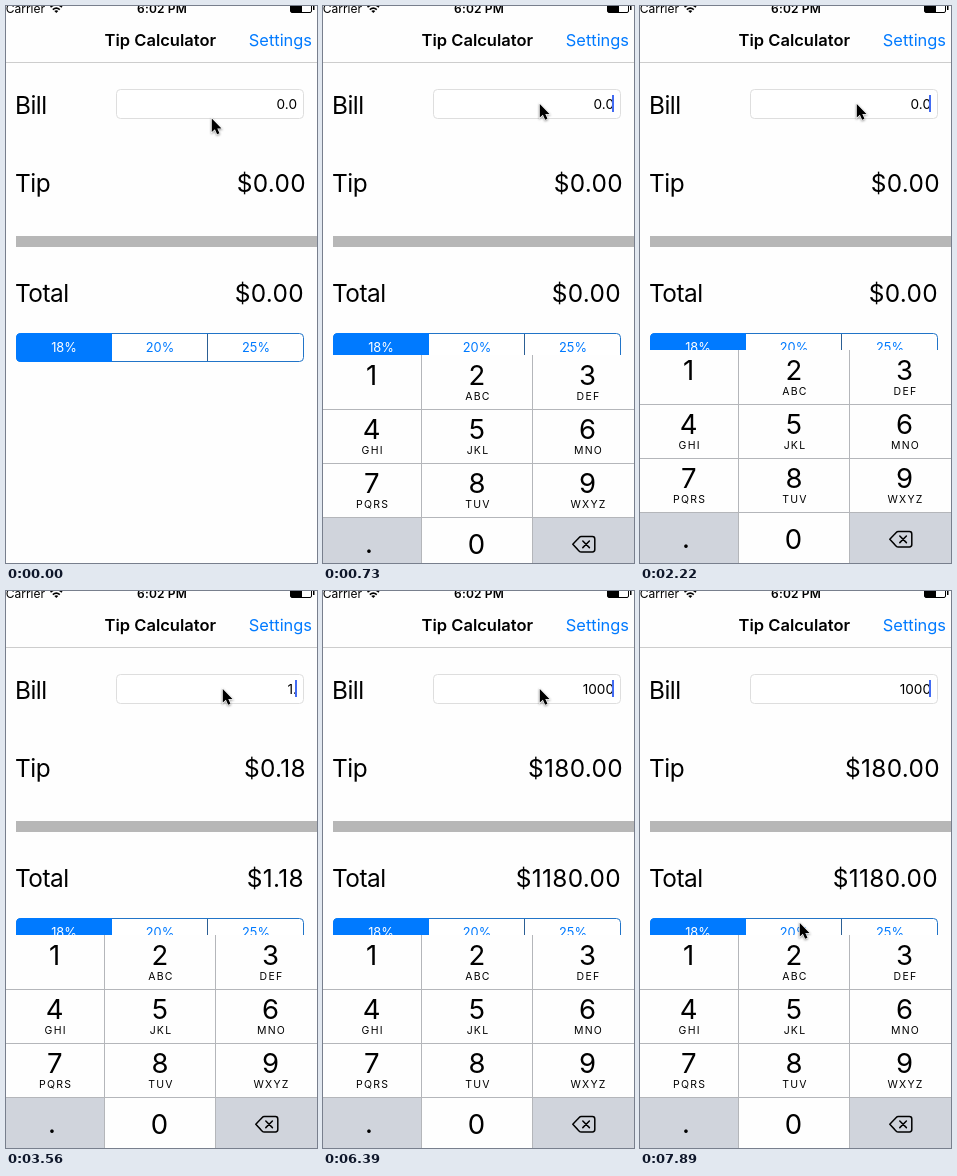
An HTML page that plays this animation: 311 by 557 pixels, repeating every 8000 ms.

```html
<!DOCTYPE html>
<html lang="en">
<head>
<meta charset="utf-8">
<title>Tip Calculator</title>
<style>
  html, body { margin: 0; width: 100%; height: 100%; overflow: hidden; background: #fff; }
  svg { display: block; width: 311px; height: 557px; font-family: Inter, "Liberation Sans", sans-serif; }
  .big { font-size: 24.4px; }
  .label { letter-spacing: -.5px; }
  .money { letter-spacing: .35px; text-anchor: end; }
  .end { text-anchor: end; }
  .mid { text-anchor: middle; }
  .blue { fill: #007aff; }
  .digit { font-size: 27.5px; text-anchor: middle; }
  .abc { font-size: 10.5px; letter-spacing: 1.25px; text-anchor: middle; }
  #pointer { filter: drop-shadow(0 1px 1px rgba(0, 0, 0, .4)); }
</style>
</head>
<body>
<svg viewBox="0 0 311 557">
  <rect width="311" height="557" fill="#fefefe"/>

  <g id="status">
    <text x="-.3" y="6.5" font-size="12">Carrier</text>
    <g fill="none" stroke="#000" stroke-width="1.6">
      <path d="M44.5 1.2Q50.3 -4 56 1.2M46.8 3.6Q50.3 .6 53.8 3.6"/>
    </g>
    <path d="M48.3 5Q50.3 3.4 52.3 5L50.3 7Z"/>
    <text class="mid" x="156" y="6.5" font-size="12" font-weight="600" letter-spacing=".15">6:02 PM</text>
    <rect x="284.5" y="-2.5" width="21" height="9" rx="1.5" fill="none" stroke="#000"/>
    <rect x="285" y="-2" width="11" height="8"/>
    <rect x="307" y="0" width="1.5" height="4"/>
  </g>

  <g id="nav">
    <text class="mid" x="154.3" y="40" font-size="16.5" font-weight="600">Tip Calculator</text>
    <text class="end blue" x="306" y="40" font-size="16.4">Settings</text>
    <rect y="56" width="311" height="1" fill="#cdcdcd"/>
  </g>

  <g class="big">
    <g class="label">
      <text x="9" y="108">Bill</text>
      <text x="9" y="186">Tip</text>
      <text x="9" y="296">Total</text>
    </g>
    <g class="money">
      <text id="tip" x="300" y="186"></text>
      <text id="total" x="298" y="296"></text>
    </g>
  </g>

  <rect x="110.5" y="83.5" width="187" height="29" rx="4" fill="#fff" stroke="#dedede"/>
  <text id="bill" class="end" x="291" y="103" font-size="13.6"></text>
  <rect id="caret" x="289" y="89" width="2" height="17" fill="#426bf2"/>

  <rect x="10" y="230" width="301" height="11" fill="#b7b7b7"/>

  <g id="rates" font-size="12.8">
    <rect x="10.5" y="327.5" width="287" height="28" rx="4" fill="#fff" stroke="#2174c8"/>
    <path d="M201.5 328v27" stroke="#2c5f94"/>
    <path d="M105.5 327.5H14.5a4 4 0 0 0-4 4v20a4 4 0 0 0 4 4h91z" fill="#007aff" stroke="#007aff"/>
    <text class="mid" x="58" y="346" fill="#fff">18%</text>
    <text class="mid blue" x="154" y="346">20%</text>
    <text class="mid blue" x="250" y="346">25%</text>
  </g>

  <g id="pad">
    <rect y="344" width="311" height="220" fill="#fefefe"/>
    <path d="M0 506h98v60H0zM210 506h101v60H210z" fill="#d0d4dc"/>
    <path d="M98.5 344v220M209.5 344v220M0 398.5h311M0 452.5h311M0 506.5h311" stroke="#b4b6ba"/>
    <g id="keys"></g>
    <g fill="none" stroke="#000" stroke-width="1.5" stroke-linejoin="round" stroke-linecap="round">
      <path d="M249.8 533.3l6.2-6.6q1-1.1 2.4-1.1h11q2.4 0 2.4 2.4v10.6q0 2.4-2.4 2.4h-11q-1.4 0-2.4-1.1z"/>
      <path d="M259.8 530l6.6 6.6M266.4 530l-6.6 6.6"/>
    </g>
  </g>

  <path id="pointer" d="M0 0V13.6L3.1 10.8L5.3 15.8L7.7 14.8L5.5 9.9H9.7Z" stroke="#fff" stroke-width="1.2" paint-order="stroke"/>
</svg>

<script>
const LOOP = 8000, RATE = 0.18;
const $ = id => document.getElementById(id);

// Each table lists [start ms, value]; a value holds until the next one.
const BILL = [[0, "0.0"], [1620, "0.01"], [2220, "0.0"], [2510, "0."], [2660, ""], [2960, "1"],
  [3410, "1."], [4010, "1.0"], [4160, "1.00"], [5050, "1.0"], [5350, "1."], [5500, "1"],
  [6100, "10"], [6250, "100"], [6390, "1000"]];
const CARET = [[0, 0], [450, 1], [1030, .5], [1180, 0], [1330, 1],
  [4760, .5], [4910, 0], [5050, 1], [6990, .5], [7140, 0], [7290, 1]];
const TICKS = [0, 150, 300, 450, 580, 730, 880, 1030, 7290, 7440, 7590, 7740, 7890].map(t => [t, t]);

const at = (table, t) => table.findLast(([start]) => start <= t)[1];
const mix = (a, b, p) => a + (b - a) * p;
const ease = p => p * p * (3 - 2 * p);
const clamp = p => Math.min(1, Math.max(0, p));

// Critically damped spring for the rising keypad.
function padOffset(t) {
  const x = Math.max(0, t - 430) * 0.0183;
  return Math.floor(213 * (1 + x) * Math.exp(-x));
}

function pointerAt(t) {
  const p = ease(clamp(t / 300)), q = ease(clamp((t - 7290) / 600));
  return [mix(mix(205.8, 216.8, p), 159.8, q), mix(mix(112.5, 98, p), 332, q)];
}

function buildKeys() {
  const letters = ["", "ABC", "DEF", "GHI", "JKL", "MNO", "PQRS", "TUV", "WXYZ"];
  const cols = [48.7, 154, 264.5];
  const label = (cls, x, y, s) => `<text class="${cls}" x="${x}" y="${y}">${s}</text>`;
  let out = label("digit", 46, 542, ".") + label("digit", 153.5, 543, "0");
  letters.forEach((abc, i) => {
    const x = cols[i % 3], y = 374 + 54 * Math.floor(i / 3);
    out += label("digit", x, y, i + 1) + label("abc", x + 1, y + 15, abc);
  });
  $("keys").innerHTML = out;
}

function setText(id, s) {
  if ($(id).textContent !== s) $(id).textContent = s;
}

function draw(t) {
  const text = at(BILL, t), amount = Number(text), tick = at(TICKS, t);
  setText("bill", text);
  setText("tip", "$" + (amount * RATE).toFixed(2));
  setText("total", "$" + (amount * (1 + RATE)).toFixed(2));
  $("caret").setAttribute("opacity", at(CARET, t));
  $("pad").setAttribute("transform", `translate(0 ${padOffset(tick)})`);
  $("pointer").setAttribute("transform", `translate(${pointerAt(tick)})`);
}

buildKeys();
const begin = performance.now();
function frame() {
  draw((performance.now() - begin) % LOOP);
  requestAnimationFrame(frame);
}
frame();
</script>
</body>
</html>
```
